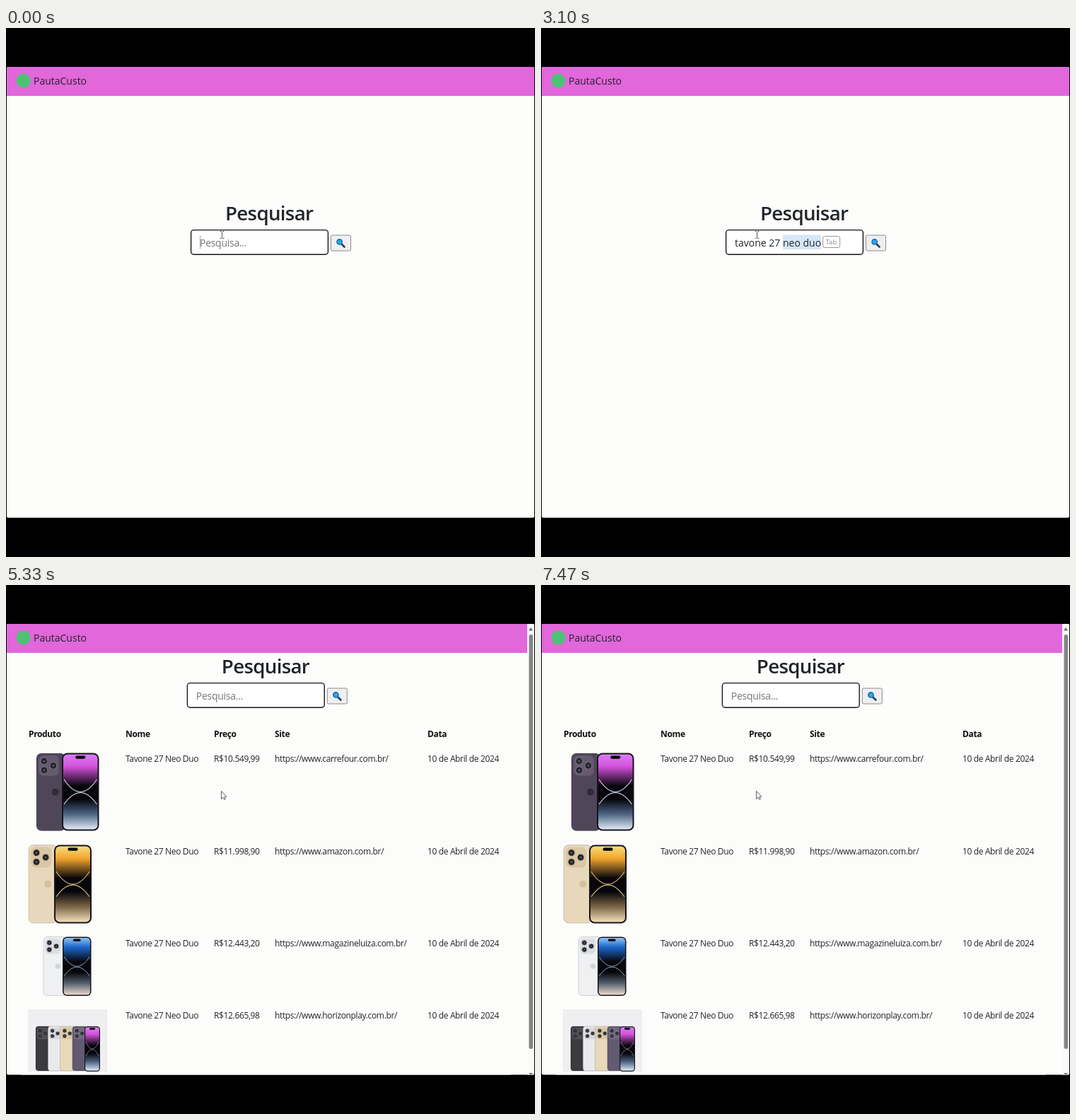
An HTML page that plays this animation: 748 px wide and 748 px high, repeating every 7510 ms.

```html
<!DOCTYPE html>
<html lang="pt-BR">
<head>
<meta charset="utf-8">
<title>PautaCusto</title>
<style>
  html, body { margin: 0; width: 100%; height: 100%; overflow: hidden; background: #000; }
  svg { display: block; width: 748px; height: 748px; font-family: "Open Sans", "Noto Sans", sans-serif; fill: #212529; }
  text { white-space: pre; }
  .brand { font-size: 14px; }
  .title { font-size: 27.7px; font-weight: 600; letter-spacing: -.025em; }
  .hint { font-size: 14px; letter-spacing: -.02em; fill: #777; }
  .typed { font-size: 14px; }
  .cell { font-size: 12px; letter-spacing: -.03em; }
  .head { font-weight: 700; fill: #111; }
  .tab { font-size: 9.5px; fill: #888; }
</style>
</head>
<body>
<svg id="stage" viewBox="0 0 748 748"></svg>
<script>
const LOOP = 7510;
const QUERY = "tavone 27 neo duo";
const TYPED = 10;
const TYPE_START = 1230, TYPE_STEP = 141;
const SUGGEST_AT = 2500, ACCEPT_AT = 4100, RESULTS_AT = 5230;
const BLINK = 530;
const TEXT_X = 274;

const rect = (x, y, w, h, fill, more = "") =>
  `<rect x="${x}" y="${y}" width="${w}" height="${h}" fill="${fill}" ${more}/>`;
const circle = (x, y, r, fill, more = "") =>
  `<circle cx="${x}" cy="${y}" r="${r}" fill="${fill}" ${more}/>`;
const text = (x, y, cls, str) => `<text x="${x}" y="${y}" class="${cls}">${str}</text>`;

const gradient = (id, stops) =>
  `<linearGradient id="${id}" x1="0" y1="0" x2="0" y2="1">` +
  stops.map(([at, color]) => `<stop offset="${at}" stop-color="${color}"/>`).join("") +
  `</linearGradient>`;

const screenGradient = (id, top, glow, low, bottom) => gradient(id, [
  [0, top], [.16, glow], [.42, "#08060d"], [.6, "#05060b"], [.8, low], [1, bottom]
]);

function phoneBack(x, y, w, h, body, lens, dot) {
  const s = h / 110;
  const camera = (dx, dy) => circle(x + dx * s, y + dy * s, 5 * s, "#24222a", `stroke="${lens}" stroke-width="${1.3 * s}"`) +
    circle(x + dx * s, y + dy * s, 1.6 * s, "#55596a");
  return rect(x, y, w, h, body, `rx="${7 * s}" stroke="#0003" stroke-width=".8"`) +
    rect(x + 3 * s, y + 3 * s, 29 * s, 29 * s, lens, `rx="${7 * s}" opacity=".55"`) +
    camera(11, 11) + camera(11, 24) + camera(24, 17.5) +
    (dot ? circle(x + 27 * s, y + 55 * s, 5 * s, dot) : "");
}

function phoneFront(x, y, w, h, id, line) {
  const s = h / 110, cx = x + w / 2, l = x + 3 * s, r = x + w - 3 * s;
  const arc = (edge, mid) =>
    `M${l} ${y + h * edge}Q${cx} ${y + h * mid} ${r} ${y + h * edge}`;
  return rect(x, y, w, h, "#17151b", `rx="${8 * s}"`) +
    rect(x + 2 * s, y + 2 * s, w - 4 * s, h - 4 * s, `url(#${id})`, `rx="${6 * s}"`) +
    `<path d="${arc(.34, .66)}${arc(.66, .36)}" fill="none" stroke="${line}" stroke-width="${1.1 * s}"/>` +
    rect(cx - 7 * s, y + 4 * s, 14 * s, 4.2 * s, "#000", `rx="${2.1 * s}"`);
}

const magnifier = `
  <path d="M474.5 305.5l4 4" stroke="#263d58" stroke-width="2.6" stroke-linecap="round"/>
  ${circle(471.6, 302.4, 3.7, "#2aa4ee", 'stroke="#1668b0" stroke-width="1.4"')}`;

const searchForm = `
  ${text(310, 272, "title", "Pesquisar")}
  ${rect(261.6, 285.6, 193.8, 34.6, "#fff", 'rx="4" stroke="#151515" stroke-width="1.4"')}
  ${rect(459.5, 293, 28, 22, "#efefef", 'rx="2" stroke="#8b8b8b"')}
  ${magnifier}`;

const columns = [32, 169, 294, 380, 596];
const header = ["Produto", "Nome", "Preço", "Site", "Data"]
  .map((h, i) => text(columns[i], 214.5, "cell head", h)).join("");

const offers = [
  [250, "10.549,99", "carrefour"],
  [381, "11.998,90", "amazon"],
  [511, "12.443,20", "magazineluiza"],
  [613, "12.665,98", "horizonplay"]
].map(([y, price, site]) =>
  ["Tavone 27 Neo Duo", "R$" + price, `https://www.${site}.com.br/`, "10 de Abril de 2024"]
    .map((s, i) => text(columns[i + 1], y, "cell", s)).join("")).join("");

const lineup = [["#3b3a3d", "#626064"], ["#e9eaec", "#c6c8cc"], ["#e8d9bb", "#cdbb99"], ["#625a70", "#82788f"]]
  .map(([body, lens], i) => phoneBack(42 + 17.3 * i, 624, 21, 63, body, lens)).join("");

const photos = `
  ${phoneBack(43, 238, 41, 109.5, "#50465a", "#766b80", "#322b3a")}
  ${phoneFront(79, 237.5, 52.5, 110, "violet", "#c5c0d8")}
  ${phoneBack(32, 367.5, 40, 110.5, "#e8d8bb", "#cdb994", "#d2c09f")}
  ${phoneFront(68, 367.5, 53, 111, "gold", "#d5b878")}
  ${phoneBack(53, 497.5, 32, 83, "#eff0f2", "#cdd0d4", "#d2d4d8")}
  ${phoneFront(80, 497.5, 40.5, 83.5, "blue", "#a4c0dc")}
  ${rect(31, 600, 112, 88, "#efeff1")}
  ${lineup}
  ${phoneFront(111, 624, 22, 64, "violet", "#a89cc0")}`;

const scrollbar = `
  ${rect(737, 55, 10, 638, "#fafafa")}
  ${rect(739.5, 70, 5.5, 586, "#858585", 'rx="2.7"')}
  <path d="M739 64.5l3-4.5 3 4.5zM739 690l3 3 3-3z" fill="#707070"/>`;

document.getElementById("stage").innerHTML = `
  <defs>
    ${screenGradient("violet", "#d77df0", "#d552dc", "#4e6686", "#dfe9f3")}
    ${screenGradient("gold", "#f5dc7c", "#f2a52c", "#7d6647", "#f1dfb9")}
    ${screenGradient("blue", "#8dc4f5", "#1d68cc", "#56616f", "#ecd9cd")}
    <clipPath id="page"><rect x="1" y="55" width="746" height="637.5" rx="2"/></clipPath>
  </defs>
  ${rect(0, 0, 748, 748, "#000")}
  <g clip-path="url(#page)">
    ${rect(1, 55, 746, 638, "#fdfdfc")}
    ${rect(1, 55, 746, 41, "#e167db")}
    ${circle(24.5, 74.5, 10, "#4cc274")}
    ${text(39, 80, "brand", "PautaCusto")}
    <g id="search">
      ${searchForm}
      <rect id="mark" y="292.5" height="20.5" fill="#d6e6f8"/>
      <text id="query" x="${TEXT_X}" y="308.5"></text>
      <g id="badge">
        ${rect(.5, 294.5, 24, 16, "#fff", 'rx="2.5" stroke="#999"')}
        ${text(4.5, 306, "tab", "Tab")}
      </g>
      <rect id="caret" y="293.5" width="1" height="19" fill="#222"/>
    </g>
    <g id="results">
      ${rect(21, 190, 693, 503, "#fcfcfa")}
      ${header}${offers}${photos}${scrollbar}
    </g>
    <path id="beam" d="M302.5 287.5h2l1 1 1-1h2M305.5 288.5v8M302.5 297.5h2l1-1 1 1h2" fill="none" stroke="#555"/>
    <path id="arrow" d="M304.5 291.5v11l2.6-2.3 1.8 3.2 1.5-.8-1.6-3.1 3-.3z" fill="#fff" stroke="#4a4a58" stroke-width=".9"/>
  </g>`;

const el = Object.fromEntries(
  ["search", "mark", "query", "badge", "caret", "results", "beam", "arrow"].map(id => [id, document.getElementById(id)]));
const show = (node, on) => node.setAttribute("display", on ? "inline" : "none");

function typedCount(t) {
  if (t < TYPE_START || t >= RESULTS_AT) return 0;
  if (t >= ACCEPT_AT) return QUERY.length;
  return Math.min(TYPED, Math.floor((t - TYPE_START) / TYPE_STEP) + 1);
}

function caretVisible(t) {
  if (t >= RESULTS_AT) return false;
  if (t < TYPE_START) return t < 270 || t >= 800;
  if (t < SUGGEST_AT) return true;
  const since = t - (t < ACCEPT_AT ? SUGGEST_AT : ACCEPT_AT);
  return Math.floor(since / BLINK) % 2 === 0;
}

function draw(t) {
  const done = t >= RESULTS_AT;
  const suggesting = t >= SUGGEST_AT && t < ACCEPT_AT;
  const count = typedCount(t);
  const shown = !count ? "Pesquisa..." : suggesting ? QUERY : QUERY.slice(0, count);

  show(el.results, done);
  el.search.setAttribute("transform", done ? "translate(-5.2 -147)" : "");
  el.query.setAttribute("class", count ? "typed" : "hint");
  if (el.query.textContent !== shown) el.query.textContent = shown;

  const caretX = TEXT_X + (count ? el.query.getSubStringLength(0, count) : 0);
  const endX = TEXT_X + el.query.getComputedTextLength();
  el.caret.setAttribute("x", caretX);
  el.caret.setAttribute("fill", count ? "#222" : "#aaa");
  show(el.caret, caretVisible(t));

  el.mark.setAttribute("x", caretX);
  el.mark.setAttribute("width", Math.max(0, endX - caretX));
  show(el.mark, suggesting);
  el.badge.setAttribute("transform", `translate(${endX + 2} 0)`);
  show(el.badge, suggesting);

  const arrow = t >= TYPE_START && t < 2300 || t >= 4300;
  show(el.arrow, arrow);
  show(el.beam, !arrow);
}

const start = performance.now();
function tick() {
  draw((performance.now() - start) % LOOP);
  requestAnimationFrame(tick);
}
tick();
</script>
</body>
</html>
```
